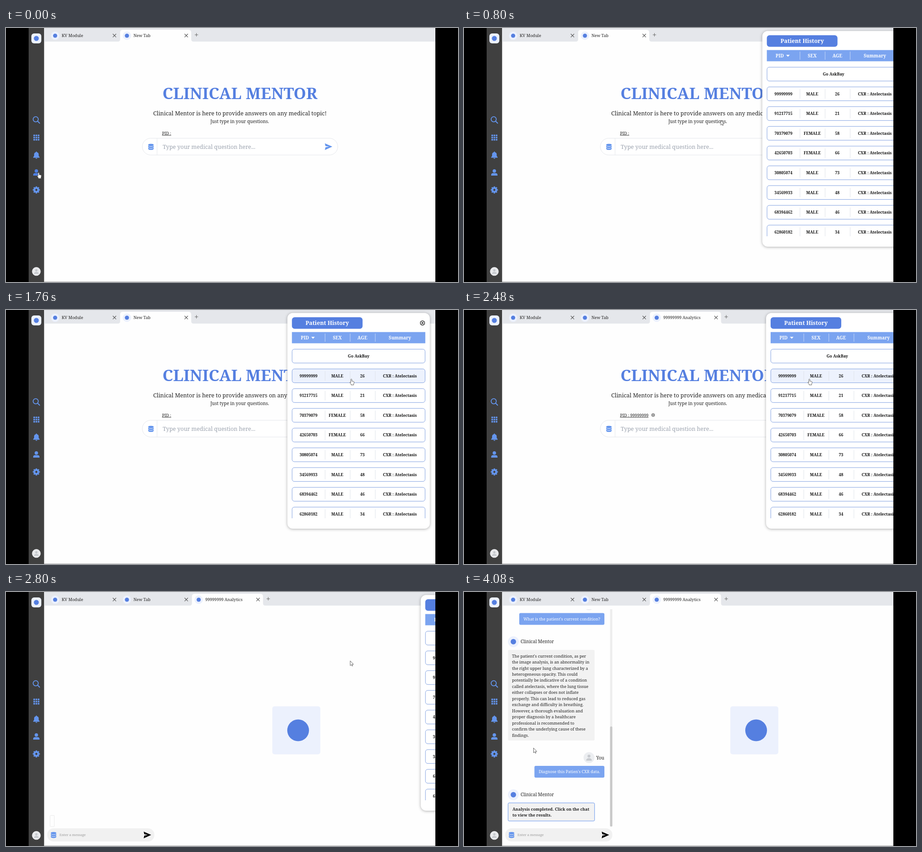
Animation of 998 by 561 pixels, one loop 4160 ms. Source, as an HTML page:

```html
<!DOCTYPE html>
<html lang="en">
<head>
<meta charset="utf-8">
<title>Patient chat</title>
<style>
html, body { margin: 0; width: 100%; height: 100%; overflow: hidden; background: #000; }
svg { display: block; width: 100%; height: 100%; }
text { font-family: "Noto Serif", serif; white-space: pre; }
#panel .card { filter: drop-shadow(0 1px 3px rgba(0, 0, 0, .32)); }
</style>
</head>
<body>
<svg id="stage" viewBox="0 0 998 561"></svg>
<script>
const LOOP = 4160, STEP = 80;
const BLUE = '#557fe0', SKY = '#6495ed', SOFT = '#7ba4f0', TILE = '#ecf1fd';
const INK = '#222', APP = 'Clinical Mentor';

// Drawing helpers; text is placed by the middle of its capitals
const rect = (x, y, w, h, fill, r = 0, more = '') =>
  `<rect x="${x}" y="${y}" width="${w}" height="${h}" rx="${r}" fill="${fill}" ${more}/>`;
const disc = (x, y, r, fill, more = '') =>
  `<circle cx="${x}" cy="${y}" r="${r}" fill="${fill}" ${more}/>`;
const path = (d, fill, more = '') => `<path d="${d}" fill="${fill}" ${more}/>`;
const line = (d, color, w = 1, more = '') =>
  path(d, 'none', `stroke="${color}" stroke-width="${w}" ${more}`);
const text = (s, x, y, size, fill = INK, more = '') =>
  `<text x="${x}" y="${y + size * .36}" font-size="${size}" fill="${fill}" ${more}>${s}</text>`;
const group = (id, body, more = '') => `<g id="${id}" ${more}>${body}</g>`;
const MID = ' text-anchor="middle"', BOLD = ' font-weight="700"';

const cross = (x, y, r, color, w) =>
  line(`M${x - r} ${y - r}l${2 * r} ${2 * r}m0 ${-2 * r}l${-2 * r} ${2 * r}`, color, w);
const closer = (x, y, r, w) =>
  disc(x, y, r, 'none', `stroke="#111" stroke-width="${w}"`) + cross(x, y, r * .42, '#111', w);
const badge = (x, y, r) => disc(x, y, r, TILE) + disc(x, y, r * .5, BLUE);
const bust = (x, y, r, back, fill) => disc(x, y, r, back) +
  disc(x, y - r * .26, r * .27, fill) +
  path(`M${x - r * .52} ${y + r * .56}q0 ${-r * .46} ${r * .52} ${-r * .46}t${r * .52} ${r * .46}z`, fill);
const plane = (x, y, fill) =>
  path(`M${x} ${y}l16.5 7.3l-16.5 7.4l1.4 -6l8 -1.4l-8 -1.4z`, fill);
const database = (x, y, back) =>
  path(`M${x - 6} ${y - 4.6}a6 2.2 0 0 1 12 0v9.2a6 2.2 0 0 1 -12 0z`, SKY) +
  [-3.2, 1].map(dy => line(`M${x - 6.2} ${y + dy}q1.6 2.4 6.2 2.4t6.2 -2.4`, back, .9)).join('');

function tab(i, name) {
  const x = 93.5 + i * 158.5;
  return group('tab' + i,
    path(`M${x - 5} 30q5 0 5 -5v-15q0 -6 6 -6h145q6 0 6 6v15q0 5 5 5z`, '#fefefe', `id="face${i}"`) +
    badge(x + 15, 17, 9.2) + text(name, x + 29.5, 17, 9) +
    cross(x + 146, 16.7, 3.7, '#555', 1.1));
}

function sidebar() {
  let s = rect(50, 0, 34, 561, '#404040') + line('M84.3 30V561', '#aaa', .6);
  s += rect(56, 12, 22, 22, TILE, 6) + disc(67, 23, 5.5, BLUE);
  s += disc(65.6, 201.6, 5.7, 'none', `stroke="${SKY}" stroke-width="1.8"`) +
    line('M69.8 205.8l4.4 4.4', SKY, 2, 'stroke-linecap="round"');
  for (let i = 0; i < 9; i++)
    s += rect(60.5 + i % 3 * 4.8, 235.4 + Math.floor(i / 3) * 4.8, 3.6, 3.6, SKY, .5);
  s += path('M66 274.2q0 -1.4 1.1 -1.4t1.1 1.4q4 1 4 5.2v3.2l2 2.6q.5 1.2 -.8 1.2h-12.6q-1.3 0 -.8 -1.2l2 -2.6v-3.2q0 -4.2 4 -5.2z', SKY) +
    path('M65 287.2h4.2q-.4 1.8 -2.1 1.8t-2.1 -1.8z', SKY);
  s += path('M63.2 315.8a3.8 3.8 0 0 1 7.6 0a3.8 3.8 0 0 1 -7.6 0zM60 326v-1.6q0 -4 4.4 -4h5.2q4.4 0 4.4 4v1.6z',
    SKY, 'id="person"');
  s += disc(67, 357.6, 4.3, 'none', `stroke="${SKY}" stroke-width="4"`) +
    disc(67, 357.6, 6.7, 'none',
      `stroke="${SKY}" stroke-width="2.4" pathLength="16" stroke-dasharray="1.15 .85" stroke-dashoffset=".57"`);
  return s + bust(67, 537.7, 9.6, '#e9eaec', '#c6c9ce');
}

function home() {
  return text(APP.toUpperCase(), 516.5, 144.5, 35, BLUE, MID + BOLD) +
    text(APP + ' is here to provide answers on any medical topic!', 516.5, 189, 12.48, INK, MID) +
    text('Just type in your questions.', 516, 206.3, 10, INK, MID) +
    text('PID :', 344.5, 232.3, 9, INK, 'id="pid" text-decoration="underline"') +
    group('unpick', closer(417.6, 232, 3.2, .9)) +
    rect(301, 243.5, 431.5, 37, '#fff', 18.5, 'stroke="#e5e7eb"') +
    line('M333.5 243.5v37', '#e5e7eb') + database(320, 262.5, '#fff') +
    text('Type your medical question here...', 346, 262.3, 12.45, '#9ca3af') +
    plane(704, 254.8, SKY);
}

function reply(y, h, lines, edge) {
  return badge(109, y - 18, 12) + text(APP, 125, y - 18, 10) +
    rect(97.3, y, 191, h, '#f2f2f2', 2.5, edge ? `stroke="${SKY}"` : '') +
    lines.map((s, i) => text(s, edge ? 107 : 106, y + 13.7 + i * 13.46, 9, INK, edge ? BOLD : '')).join('');
}

function question(x, y, s) {
  return bust(276, y - 18.3, 12, '#eceef1', '#c8cbd0') + text('You', 292, y - 18, 10) +
    rect(x, y, 310 - x, 26, SOFT, 3) + text(s, (x + 310) / 2, y + 13.2, 9, '#fff', MID);
}

function chat() {
  const answer = [
    "The patient's current condition, as per", 'the image analysis, is an abnormality in',
    'the right upper lung characterized by a', 'heterogeneous opacity. This could',
    'potentially be indicative of a condition', 'called atelectasis, where the lung tissue',
    'either collapses or does not inflate', 'properly. This can lead to reduced gas',
    'exchange and difficulty in breathing.', 'However, a thorough evaluation and',
    'proper diagnosis by a healthcare', 'professional is recommended to',
    'confirm the underlying cause of these', 'findings.'];
  return '<clipPath id="chatClip"><rect x="85" y="38" width="243" height="481"/></clipPath>' +
    '<g clip-path="url(#chatClip)">' +
    question(122, 46.5, "What is the patient's current condition?") +
    reply(127.7, 200.3, answer) +
    question(155.5, 384, "Diagnose this Patien's CXR data.") +
    reply(465.8, 40, ['Analysis completed. Click on the chat', 'to view the results.'], true) +
    '</g>' + rect(322.5, 38, 5, 480, '#ededed') + rect(322.5, 297, 5, 221, '#c9c9c9', 2);
}

function result() {
  return rect(588, 252.5, 106, 106, TILE, 5) + disc(645, 305.5, 24, BLUE) +
    group('blank', rect(97.3, 493.5, 9.4, 24.5, 'none', 1, 'stroke="#eaeaea"')) +
    group('chat', chat()) +
    rect(91, 522, 236.5, 29, '#f1f1f1', 14) + database(105, 536.7, '#f1f1f1') +
    text('Enter a message', 118, 536.7, 7.5, '#999') + plane(304, 529.2, '#000');
}

const PATIENTS = [
  [99999999, 'MALE', 26], [91217715, 'MALE', 21], [70379079, 'FEMALE', 58], [42650703, 'FEMALE', 66],
  [30805074, 'MALE', 73], [34569933, 'MALE', 48], [68394462, 'MALE', 46], [62860182, 'MALE', 34]];
const ROW = 43.6, COLS = [46.7, 110.2, 165.6, 248.4];
const rowTop = i => 86.5 + ROW * i;
const bars = (y, h, color) => line([83.2, 138.6, 194].map(x => `M${x} ${y}v${h}`).join(''), color);

// Panel is drawn from its own left edge
function panel() {
  const cells = (list, y, size, fill) =>
    list.map((s, k) => text(s, COLS[k], y, size, fill, MID + BOLD)).join('');
  let rows = '';
  for (let i = 0; i <= PATIENTS.length; i++) {
    const y = rowTop(i), mid = y + 15.4;
    rows += rect(10.4, y, 293.6, 30.6, '#fff', 5, `stroke="#7f9fe0" id="row${i}"`);
    rows += i
      ? bars(y + 5, 21, '#dfe3ea') + cells([...PATIENTS[i - 1], 'CXR : Atelectasis'], mid, 8.85, '#111')
      : text('Go AskBay', 157.3, mid, 8.9, '#111', MID + BOLD);
  }
  return rect(0, 6.5, 314.5, 476.5, '#fff', 12, 'class="card"') +
    rect(10, 16, 156, 25.5, BLUE, 6) + text('Patient History', 88, 28.8, 12.5, '#fff', MID + BOLD) +
    closer(298.3, 28.6, 4.8, 1.2) + rect(10, 48.7, 294.5, 24.8, SOFT) + bars(52, 18, '#c5d7f8') +
    cells(['', 'SEX', 'AGE', 'Summary'], 61.3, 10, '#fff') +
    text('PID', 38.5, 61.3, 10, '#fff', MID + BOLD) + path('M52.6 59.2h8l-4 4.4z', '#fff') +
    '<clipPath id="rowClip"><rect x="0" y="80" width="314" height="380"/></clipPath>' +
    group('rows', rows, 'clip-path="url(#rowClip)"');
}

const pen = 'stroke="#555" stroke-width=".9" stroke-linejoin="round"';
const stage = document.getElementById('stage');
stage.innerHTML = rect(84, 0, 864, 561, '#fefefe') +
  rect(84, 0, 864, 30, '#e5e7eb') +
  tab(0, 'KV Module') + tab(1, 'New Tab') + tab(2, '99999999 Analytics') +
  group('plus', line('M-3.7 15h7.4m-3.7 -3.7v7.4', '#666', 1)) +
  group('home', home()) + group('result', result()) +
  line('M84 560.5h864', '#999', .8) + group('panel', panel()) +
  rect(0, 0, 50, 561, '#000') + rect(948, 0, 50, 561, '#000') + sidebar() +
  group('arrow', path('M0 0v10.6l2.5 -2.2l1.6 3.3l1.5 -.7l-1.6 -3.2h3.3z', '#fff', pen)) +
  group('hand', path('M1.3 1.1q1.2 -1.7 2.4 0v3.9l3.9 .8q1.2 .4 1 2.2l-.9 3.5v2h-5.7v-1.5l-2.5 -3.4q-.6 -1.4 .6 -1.3l1.2 1z', '#fff', pen));

const $ = id => document.getElementById(id);
const show = (id, on) => $(id).setAttribute('display', on ? 'inline' : 'none');
const move = (id, x, y = 0) => $(id).setAttribute('transform', `translate(${x} ${y})`);

// cubic-bezier(.25, .1, .25, 1)
function ease(x) {
  if (x <= 0) return 0;
  if (x >= 1) return 1;
  let a = 0, b = 1, s;
  for (let i = 0; i < 24; i++) {
    s = (a + b) / 2;
    if (.75 * s - .75 * s * s + s ** 3 < x) a = s; else b = s;
  }
  return .3 * (1 - s) ** 2 * s + 3 * (1 - s) * s * s + s ** 3;
}

const PANEL_X = 621.3, TRAVEL = 340;
const panelX = t => PANEL_X + TRAVEL * (1 - ease((t - 387) / 680) + ease((t - 2392) / 712));

// time, x, y
const POINTER = [[0, 69.5, 319], [640, 69.5, 319], [960, 689.5, 175.5], [1200, 760, 152],
  [2960, 760, 152], [4080, 153.5, 344.5]];
function pointer(t) {
  const i = POINTER.findIndex(k => k[0] > t);
  if (i < 0) return POINTER[POINTER.length - 1].slice(1);
  const [t0, x0, y0] = POINTER[i - 1], [t1, x1, y1] = POINTER[i];
  const p = ease((t - t0) / (t1 - t0));
  return [x0 + (x1 - x0) * p, y0 + (y1 - y0) * p];
}

function draw(t) {
  const opened = t >= 2480, loaded = t >= 2640, talked = t >= 3040, listed = t >= 800;
  const px = panelX(t), [x, y] = pointer(t), active = opened ? 2 : 1;

  for (let i = 0; i < 3; i++) show('face' + i, i === active);
  show('tab2', opened);
  move('plus', opened ? 579 : 420.5);
  show('home', !loaded);
  show('result', loaded);
  show('blank', !talked);
  show('chat', talked);
  $('pid').textContent = opened ? 'PID : 99999999' : 'PID :';
  show('unpick', opened);

  show('panel', px < 955);
  move('panel', px);
  show('rows', listed);
  let over = false;
  for (let i = 0; i <= PATIENTS.length; i++) {
    const top = rowTop(i);
    const hit = listed && x + 2.5 > px + 10 && x < px + 304 && y > top && y < top + 31;
    $('row' + i).setAttribute('fill', hit ? '#edf2fd' : '#fff');
    over = over || hit;
  }

  const onPerson = x < 78 && y > 310 && y < 328;
  $('person').setAttribute('fill', onPerson ? '#4f7fe2' : SKY);
  show('hand', over || onPerson);
  show('arrow', !(over || onPerson));
  move('hand', x, y);
  move('arrow', x, y);
}

const start = performance.now();
function tick(now) {
  const t = Math.max(0, now - start) % LOOP;
  draw(Math.floor(t / STEP) * STEP);
  requestAnimationFrame(tick);
}
draw(0);
requestAnimationFrame(tick);
</script>
</body>
</html>
```
